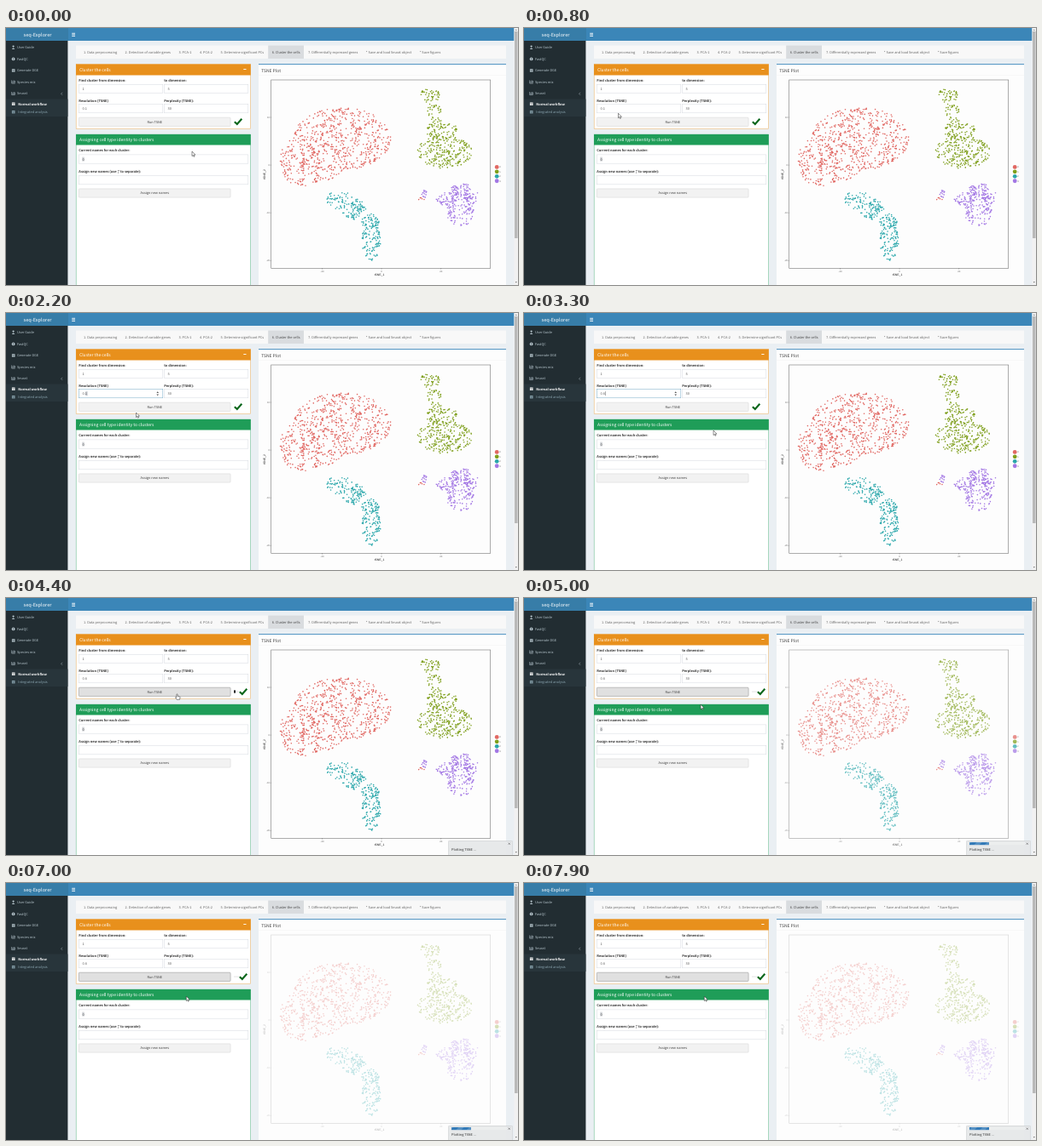
Write an HTML page that moves like this. It is 600x302 px and loops after 8000 ms.

```html
<!DOCTYPE html>
<html lang="en">
<head>
<meta charset="utf-8">
<title>Cluster the cells</title>
<style>
html, body { margin: 0; width: 100%; height: 100%; overflow: hidden; background: #eaeff3; }
svg { display: block; width: 600px; height: 302px; }
text {
  font: 3.91px "Noto Sans CJK SC", "Noto Sans CJK JP", "Noto Sans CJK KR", "Noto Sans CJK", "Open Sans", sans-serif;
  text-rendering: geometricPrecision;
  white-space: pre;
}
.bold { font-weight: 700; }
.medium { font-weight: 500; }
.mid { text-anchor: middle; }
.end { text-anchor: end; }
.tick { font-family: "Liberation Sans", Arial, sans-serif; }
</style>
</head>
<body>
<svg id="stage" viewBox="0 0 600 302" xmlns="http://www.w3.org/2000/svg"></svg>
<script>
const NS = "http://www.w3.org/2000/svg";
const BODY = 3.91, TITLE = 5;
let layer = document.getElementById("stage");

function add(tag, attrs) {
  const el = document.createElementNS(NS, tag);
  for (const key in attrs) el.setAttribute(key, attrs[key]);
  layer.appendChild(el);
  return el;
}
const rect = (x, y, width, height, fill, more) => add("rect", { x, y, width, height, fill, ...more });
const line = (d, stroke, width = 0.5, more) =>
  add("path", { d, stroke, "stroke-width": width, fill: "none", ...more });
const shape = (d, fill, more) => add("path", { d, fill, ...more });
const dot = (cx, cy, r, fill) => add("circle", { cx, cy, r, fill });
function text(x, y, str, fill = "#444", size = BODY, cls = "", more) {
  const el = add("text", { x, y, fill, class: cls, ...more });
  el.style.fontSize = size + "px";
  el.textContent = str;
  return el;
}
function group(build, attrs) {
  const outer = layer;
  const g = layer = add("g", attrs);
  build();
  layer = outer;
  return g;
}
const show = (el, on) => el.setAttribute("visibility", on ? "visible" : "hidden");

// Top bar and sidebar
rect(0, 0, 73, 15, "#377da8");
rect(73, 0, 522.5, 15, "#3b86b8");
text(37, 9.6, "seq-Explorer", "#fff", 5.6, "mid medium");
for (let i = 0; i < 3; i++) rect(77.2, 5.8 + i * 1.6, 3.8, 0.8, "#fff");
rect(0, 15, 72.4, 287, "#222d32");
rect(0, 83.5, 72.4, 20.5, "#28353b");

const pale = "#b8c7ce";
const itemY = i => 24.2 + i * 13.55;
["User Guide", "FastQC", "Generate DGE", "Species mix", "Seurat"].forEach((name, i) => text(13, itemY(i), name, pale));
dot(8.6, 21.6, 1.1, pale);
shape("M6.8 24.9Q8.6 21.9 10.4 24.9Z", pale);
dot(8.6, 36.4, 1.9, pale);
rect(8.3, 35.2, 0.6, 2.4, "#222d32");
function gridIcon(y, color) {
  rect(6.9, y, 3.6, 3.4, color);
  line(`M6.9 ${y + 1.3}h3.6M8.7 ${y + 1}v2.4`, "#222d32", 0.35);
}
for (const y of [itemY(3), itemY(4)]) line(`M6.7 ${y - 3.4}v3.6h4M8 ${y - 0.4}v-2m1.2 2v-3m1.2 3v-2.4`, pale, 0.6);
gridIcon(48.2, pale);
gridIcon(87.5, "#fff");
gridIcon(97, "#8aa4af");
line("M66 75.8l-1.4 1.5l1.4 1.5", pale);
text(14.3, 90.6, "Normal workflow", "#fff", BODY, "bold");
text(14.3, 100, "Integrated analysis", "#8aa4af");

// Scroll bar
rect(595.5, 0, 4.5, 302, "#f1f1f1");
rect(596, 4, 3.6, 243, "#b9b9b9");
shape("M596.7 2.8l1.1-1.4l1.1 1.4ZM596.7 298l1.1 1.4l1.1-1.4Z", "#777");

// Tabs, each placed after the width of the one before
rect(82, 20.5, 504, 15.5, "#f8f8f8");
const activeTab = rect(0, 20.5, 0, 15.5, "#d9dcdf");
const tabs = [
  "Data preprocessing", "Detection of variable genes", "PCA-1", "PCA-2", "Determine significant PCs",
  "Cluster the cells", "Differentially expressed genes", "Save and load Seurat object", "Save figures"
];
let tabX = 91;
tabs.forEach((name, i) => {
  const active = i === 5;
  const el = text(tabX, 29.9, (i < 7 ? i + 1 + ". " : "* ") + name, active ? "#444" : "#666");
  const width = el.getComputedTextLength();
  if (active) {
    activeTab.setAttribute("x", tabX - 4.5);
    activeTab.setAttribute("width", width + 9);
  }
  tabX += width + 9.5;
});

// Form panels
function panel(y, h, headH, color, title) {
  rect(82.2, y, 204.3, h, "#fff", { stroke: color, "stroke-width": 0.6, "stroke-opacity": 0.6 });
  rect(82, y, 204.8, headH, color);
  text(86, y + headH / 2 + 1.9, title, "#fff", TITLE, "medium");
}
const label = (x, y, str) => text(x, y, str, "#333", BODY, "bold");
const value = (x, y, str) => text(x + 4.2, y + 6.6, str, "#555");
function input(x, y, w, str) {
  const box = rect(x, y, w, 10.3, "#fff", { stroke: "#d6dae0", "stroke-width": 0.5 });
  if (str) value(x, y, str);
  return box;
}
function button(y, str) {
  const box = rect(85.3, y, 177.8, 10.2, "#f2f2f2", { stroke: "#d8d8d8", "stroke-width": 0.6, rx: 0.9 });
  text(174.3, y + 6.5, str, "#444", BODY, "mid");
  return box;
}
const L = 85.3, R = 185.3, HALF = 98.5;

panel(42.5, 76, 13, "#e8901c", "Cluster the cells");
rect(278.3, 48.1, 3.2, 0.9, "#fff");
label(L, 63.2, "Find cluster from dimension:");
label(R, 63.2, "to dimension:");
label(L, 86.5, "Resolution (TSNE)");
label(R, 86.5, "Perplexity (TSNE):");
input(L, 66.3, HALF, "1");
input(R, 66.3, HALF, "5");
input(R, 89.5, HALF, "30");
const resBox = input(L, 89.5, HALF);
const resMark = rect(93.2, 92.2, 2.4, 5, "#c6c9cf");
const resText = value(L, 89.5, "0.1");
const caret = rect(95.6, 92.1, 0.4, 5, "#333");
const spin = shape("M176.4 93.9l1.3-1.6l1.3 1.6ZM176.4 95.6l1.3 1.6l1.3-1.6Z", "#555");
const runBox = button(105.2, "Run TSNE");
const check = line("M267.8 110.2L270.8 112.9L276.3 106.8", "#07661a", 2.1);
const pulses = [268, 270, 272].map(cx => add("ellipse", { cx, cy: 110 }));

panel(125, 180, 12.5, "#1f9d58", "Assigning cell type identity to clusters");
label(L, 145.3, "Current names for each cluster:");
label(L, 170.3, "Assign new names (use ',' to separate):");
input(L, 148.9, 198.5);
rect(89.2, 151.6, 2.6, 5, "#d4d6da");
value(L, 148.9, "0");
input(L, 173.5, 198.5);
button(188.9, "Assign new names");

// Plot panel
rect(296, 43, 290, 259, "#fdfdfd");
rect(296, 42, 290, 1.1, "#5b9ac6");
rect(296, 55.2, 290, 0.4, "#f0f0f0");
text(299.2, 51.5, "TSNE Plot", "#444", TITLE);

let seed = 11;
function random() {
  seed = seed * 16807 % 2147483647;
  return seed / 2147483647;
}
// Scatter points over a union of ellipses, thinned by a wavy density
function cluster(color, count, blobs) {
  const inside = (x, y) => blobs.some(([cx, cy, rx, ry]) => ((x - cx) / rx) ** 2 + ((y - cy) / ry) ** 2 < 1);
  const density = (x, y) => 0.6 + 0.5 * Math.sin(x / 4 + 2 * Math.sin(y / 6)) * Math.sin(y / 4 + x / 11);
  const left = Math.min(...blobs.map(b => b[0] - b[2])), right = Math.max(...blobs.map(b => b[0] + b[2]));
  const top = Math.min(...blobs.map(b => b[1] - b[3])), bottom = Math.max(...blobs.map(b => b[1] + b[3]));
  const pts = [];
  while (pts.length < count) {
    const x = left + random() * (right - left), y = top + random() * (bottom - top);
    if (inside(x, y) && random() < density(x, y)) pts.push(`M${x.toFixed(1)} ${y.toFixed(1)}h.01`);
  }
  line(pts.join(""), color, 1.6, { "stroke-linecap": "round" });
}
const [red, green, cyan, purple] = ["#e16863", "#7f9f1c", "#2aa7ab", "#a377e4"];

const plot = group(() => {
  rect(310.7, 61, 257, 221.4, "none", { stroke: "#777", "stroke-width": 0.6 });
  for (let i = 0; i < 4; i++) {
    const y = 105 + i * 56.1;
    line(`M309.6 ${y}h1.1`, "#555");
    text(309, y + 1, 10 - i * 10, "#666", 2.8, "tick end");
  }
  for (let i = 0; i < 3; i++) {
    const x = 370.5 + i * 69.6;
    line(`M${x} 282.4v1.1`, "#555");
    text(x, 287, i * 20 - 20, "#666", 2.8, "tick mid");
  }
  text(437.5, 291, "tSNE_1", "#111", 3.4, "tick mid");
  text(0, 0, "tSNE_2", "#111", 3.4, "tick mid", { transform: "translate(303.8 172) rotate(-90)" });

  cluster(red, 780, [[394, 130, 57, 37], [362, 152, 41, 29], [350, 168, 26, 18]]);
  cluster(cyan, 300, [[391, 202, 15, 11], [408, 213, 15, 12], [427, 227, 11, 9], [428, 250, 11, 23]]);
  cluster(green, 430, [[497, 79, 11, 9], [502, 97, 8, 16], [511, 122, 18, 15], [514, 146, 32, 20]]);
  cluster(purple, 260, [[534, 197, 22, 14], [532, 214, 16, 20], [514, 202, 10, 6]]);
  cluster(purple, 14, [[490, 195, 4, 5]]);
  cluster(red, 5, [[487, 201, 4, 2]]);

  [red, green, cyan, purple].forEach((color, i) => {
    const y = 163.4 + i * 5.45;
    dot(575.2, y, 2.4, color);
    text(578.2, y + 1, i, "#555", 2.6, "tick");
  });
});

// Progress notice
const notice = group(() => {
  rect(518.3, 285.5, 75.4, 18, "#e6e8ea", { stroke: "#c8cacc", "stroke-width": 0.6, rx: 0.9, opacity: 0.95 });
  text(522, 297.2, "Plotting TSNE ...", "#333");
  line("M588.7 287.7l2 2m0-2l-2 2", "#555", 0.6);
});
const STRIPE = 12.5;
let stripes;
add("clipPath", { id: "barClip" }).innerHTML = '<rect x="522" y="287" width="23" height="3.2"/>';
const bar = group(() => {
  rect(522, 287, 65, 3.2, "#f2f3f4", { opacity: 0.5 });
  rect(522, 287, 23, 3.2, "#337ab7");
  group(() => {
    let d = "";
    for (let i = 0; i < 5; i++) d += `M${496 + i * STRIPE} 290.2l3.2-3.2h6.2l-3.2 3.2Z`;
    stripes = shape(d, "#fff", { opacity: 0.18 });
  }, { "clip-path": "url(#barClip)" });
});

// Pointers, hot spot at 0,0
const outline = { stroke: "#222", "stroke-width": 0.5 };
const arrow = shape("M0 0V5.6L1.3 4.4L2.1 6.3L3 5.9L2.2 4.1H3.9Z", "#fff", outline);
const hand = shape("M-.6 .2Q0-.5.6 .2V2.3L3.1 2.9Q3.7 3.2 3.5 4.1L3 6.3H-.4L-2.1 3.8Q-1.8 3-.6 3.9Z", "#fff", outline);

const clamp = v => Math.min(1, Math.max(0, v));
const ease = u => u * u * (3 - 2 * u);
const moves = [
  { from: 0, to: 1000, x: 98, y: 95 },
  { from: 1100, to: 1600, x: 83, y: 96 },
  { from: 2000, to: 2400, x: 222, y: 138 },
  { from: 3300, to: 4000, x: 200.5, y: 113 },
  { from: 4600, to: 5300, x: 211.3, y: 133 }
];
function pointerAt(t) {
  let x = 218, y = 145;
  for (const m of moves) {
    const k = ease(clamp((t - m.from) / (m.to - m.from)));
    x += (m.x - x) * k;
    y += (m.y - y) * k;
  }
  return [x, y];
}

const LOOP = 8000, STEP = 100;
const FOCUS = 1100, SELECT = 1400, ERASE = 2600, TYPED = 2900, CLICK = 4200, FADE = 4900;
const PULSE = 900;

function draw(t) {
  const focused = t >= FOCUS && t < CLICK;
  const busy = t >= CLICK;
  const picked = t >= SELECT && t < ERASE;
  resText.textContent = t < ERASE ? "0.1" : t < TYPED ? "0." : "0.6";
  resBox.setAttribute("stroke", focused ? "#74a9c6" : "#d6dae0");
  show(resMark, picked);
  show(spin, focused);
  show(caret, focused && !picked);
  caret.setAttribute("x", t >= ERASE && t < TYPED ? 92.9 : 95.6);

  const [x, y] = pointerAt(t);
  const over = x > 85 && x < 264 && y > 105 && y < 115.4;
  for (const el of [arrow, hand]) el.setAttribute("transform", `translate(${x} ${y})`);
  show(arrow, !over);
  show(hand, over);
  runBox.setAttribute("fill", busy ? "#e0e0e0" : over ? "#e7e7e7" : "#f2f2f2");
  runBox.setAttribute("stroke", busy ? "#9a9a9a" : over ? "#adadad" : "#d8d8d8");

  check.setAttribute("transform", `translate(${busy ? 6 : 0} 0)`);
  const lit = Math.floor((t + 175) % PULSE / 150);
  pulses.forEach((el, i) => {
    const on = lit === i;
    show(el, busy);
    el.setAttribute("rx", on ? 1 : 0.5);
    el.setAttribute("ry", on ? 2 : 0.5);
    el.setAttribute("fill", on ? "#111" : "#b5b5b5");
  });

  plot.setAttribute("opacity", 1 - 0.7 * clamp((t - FADE) / 250));
  show(notice, busy);
  show(bar, t >= FADE);
  stripes.setAttribute("transform", `translate(${STRIPE * (1 - t % 2000 / 2000)} 0)`);
}

const start = performance.now();
function tick() {
  const t = (performance.now() - start) % LOOP;
  draw(Math.floor(t / STEP) * STEP);
  requestAnimationFrame(tick);
}
draw(0);
requestAnimationFrame(tick);
</script>
</body>
</html>
```
